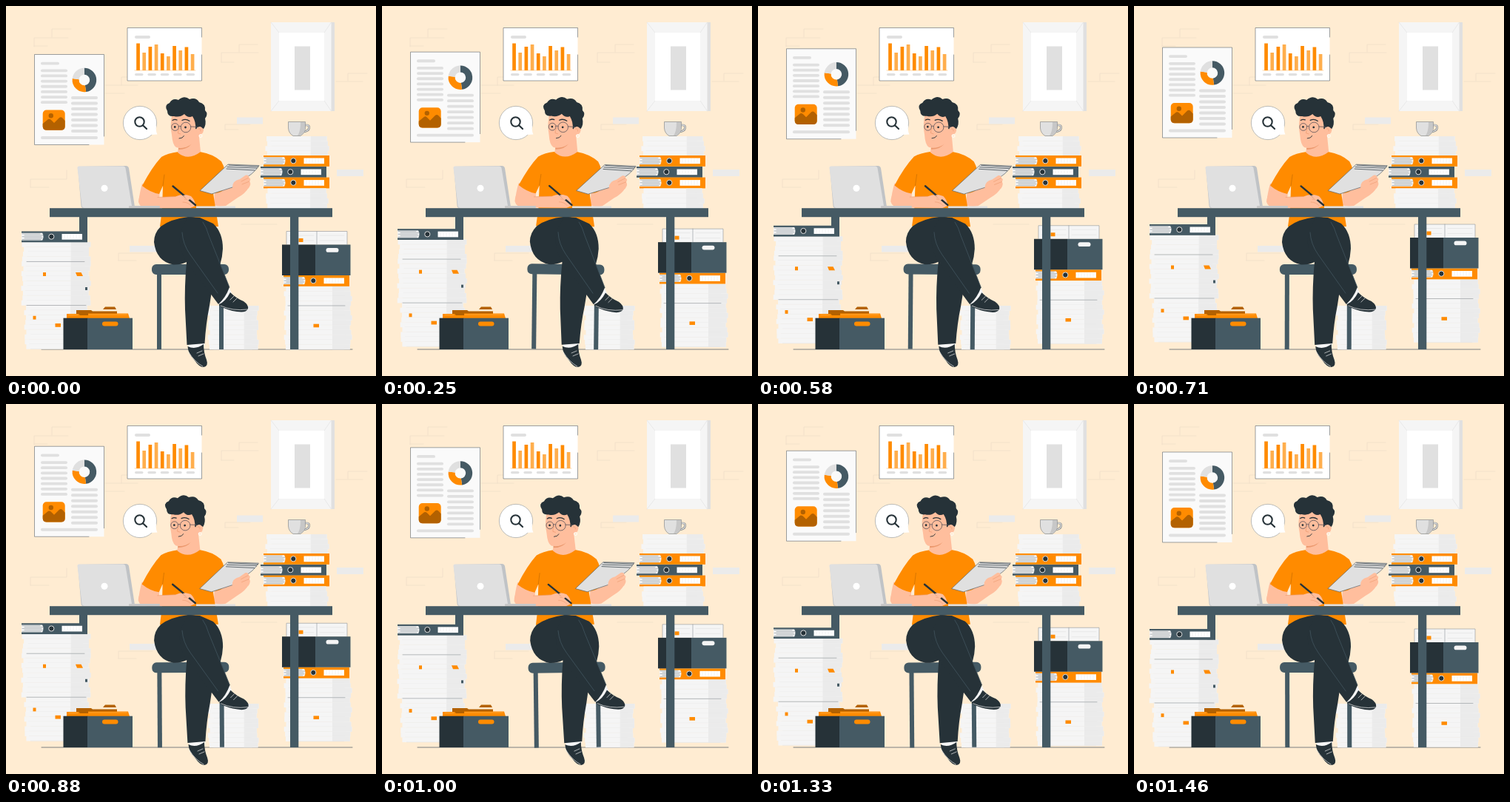
Recreate the animation shown at these times as an HTML page. Size 500x500 px, loop 1500 ms.

```html
<!DOCTYPE html>
<html lang="en">
<head>
<meta charset="utf-8">
<title>Paperwork</title>
<style>
  html, body { margin: 0; width: 100%; height: 100%; overflow: hidden; background: #ffecd2; }
  svg { display: block; width: 100vw; height: 100vh; }
</style>
</head>
<body>
<svg id="stage" viewBox="0 0 500 500"></svg>
<script>
const ORANGE = '#ff8b00', AMBER = '#ffae4d', BROWN = '#b36100', DARK = '#263238', SLATE = '#455a64',
  SKIN = '#ffbe9d', BLUSH = '#eb996e', GREY = '#e0e0e0', MIST = '#ebebeb', SNOW = '#f5f5f5',
  WHITE = '#fff', INK = '#59636a';

const rect = (x, y, w, h, fill, r = 0) =>
  `<rect x="${x}" y="${y}" width="${w}" height="${h}" rx="${r}" fill="${fill}"/>`;
const disc = (x, y, r, fill, stroke = 'none', w = 1) =>
  `<circle cx="${x}" cy="${y}" r="${r}" fill="${fill}" stroke="${stroke}" stroke-width="${w}"/>`;
const shape = (d, fill, stroke = 'none', w = .6) =>
  `<path d="${d}" fill="${fill}" stroke="${stroke}" stroke-width="${w}"/>`;
const line = (d, stroke, w = .6, cap = 'round') =>
  `<path d="${d}" fill="none" stroke="${stroke}" stroke-width="${w}" stroke-linecap="${cap}" stroke-linejoin="round"/>`;
const bar = (x, y, w) => rect(x, y - 1.9, w, 3.8, GREY, 1.9);
const range = (n, fn) => Array.from({ length: n }, (_, i) => fn(i)).join('');
const group = (cls, ...parts) => `<g class="${cls}">${parts.join('')}</g>`;

// A pile of loose sheets with uneven ends and a shaded right side.
function pages(x, y, w, h) {
  const n = Math.max(1, Math.round(h / 6.5)), step = h / n;
  return range(n, i => {
    const a = x + 2 + 1.5 * Math.sin(i * 2.3 + y), b = x + w - 2 + 1.5 * Math.sin(i * 1.7 + x);
    const top = y + i * step, split = x + w * .71;
    return rect(a, top, b - a, step + .2, SNOW) + rect(split, top, b - split, step + .2, MIST) +
      line(`M${a + 6} ${top + step}H${b - 8}`, GREY, .5);
  });
}

function binder(x, y, color) {
  return rect(x, y, 89, 14.8, color) + rect(x, y + 2.2, 28, 10, SNOW) +
    shape(`M${x + 28} ${y + 2}q3 5 0 10.5z`, SNOW) +
    range(5, i => line(`M${x + 1 + i % 2 * 3} ${y + 3.4 + i * 1.9}h${24 + i % 3}`, '#78828a', .55)) +
    disc(x + 40.3, y + 7.2, 3.6, DARK, GREY) +
    rect(x + 54.5, y + 3.5, 27.5, 7.7, WHITE) +
    range(6, i => line(`M${x + 58 + i * 4} ${y + 4.5}v5.5`, GREY, .4));
}

const wall = line('M38 55V43H84M62 42V31H88M38 54H56M291 76V63H341M315 62V52H340M291 76H308' +
    'M446 102H482M462 101V91H488M33 245V234H82V222M33 245H58M134 107H178M156 107V96H178M134 118H160' +
    'M296 167V160H330M296 167H314M152 344V334H198M152 344H176M318 295H366', '#efdfc8', .8) +
  rect(312, 150.5, 35, 9, MIST) + rect(447, 221, 36, 9, MIST) + rect(167, 324, 36, 8.5, MIST);

const ring = (d, color) => line(d, color, 9, 'butt');
const poster = rect(38.5, 65.5, 94, 122, '#fafafa') +
  line('M112 187.5H38.5V65.5H132.5V176', INK) +
  bar(47, 77.6, 25) +
  range(7, i => bar(47, 87.3 + i * 7.15, 36)) +
  range(7, i => bar(88, 124 + i * 7.5, 36)) +
  bar(47, 178, 77) +
  ring('M105.8 88.3A11.7 11.7 0 0 1 107.5 111.6', SLATE) +
  ring('M107.5 111.6A11.7 11.7 0 0 1 94.2 98.6', ORANGE) +
  ring('M94.2 98.6A11.7 11.7 0 0 1 105.8 88.3', GREY) +
  rect(49.7, 140.6, 30, 27.2, ORANGE, 5) + disc(60.8, 148.2, 3.2, BROWN) +
  shape('M49.7 159L57 153Q59 152 61 154L65 158L72 151Q74 149.5 76 151L79.7 155V162.8Q79.7 167.8 74.7 167.8H54.7Q49.7 167.8 49.7 162.8Z', BROWN);

const chart = rect(164, 29.5, 100.5, 71.5, WHITE) +
  line('M264.5 66V101H164V29.5H264.5V42', INK) + bar(174, 42, 21) +
  [50.5, 63, 55, 52, 64, 68, 54, 60, 55.5, 65]
    .map((y, i) => rect(176.2 + i * 8.17, y, 4.7, 87 - y, i % 2 ? AMBER : ORANGE)).join('') +
  line('M174 87H256', AMBER, .5) +
  range(5, i => rect(174 + i * 17.4, 91, 11.5, 3.2, GREY, 1.6));

const picture = rect(358, 22, 86, 120, GREY) + rect(358, 22, 81.5, 120, SNOW) +
  line('M358 22L369 36M439.5 22L430 36M358 142L369 128M439.5 142L430 128', GREY) +
  rect(369, 36, 61, 92, WHITE) + rect(390, 54.5, 21, 59, GREY);

const bubble = disc(181, 158, 22.6, WHITE, '#8d9498', .6) +
  shape('M195 174L204.5 173.5Q202 169 203.2 162L196 160Z', WHITE) +
  disc(180.5, 156.5, 6.2, 'none', DARK, 2.1) + line('M185 161.2L190 166', DARK, 2.2);

const handle = 'M403 161H407Q410 161 409.5 165T402 170';
const deskPile = pages(350, 176, 87, 26.5) + binder(348, 202, ORANGE) + binder(344, 217, SLATE) +
  binder(348, 231.6, ORANGE) + pages(350, 246.5, 86, 27) +
  line(handle, '#777d80', 2.6) + line(handle, GREY, 1.3) +
  shape('M381.5 156.5H404.5V165Q404 172 398 175.5H388Q382 172 381.5 165Z', GREY, '#777d80') +
  shape('M398 157H404V165Q404 172 398 175H394Q398 170 398 157Z', '#c7c7c7');

const leftPile = pages(21, 319, 94, 26) + pages(20, 345, 95, 59.5) + pages(24, 404.5, 89, 59) +
  line('M28 345.5H106M28 404.5H108', '#8b9398') + binder(21, 304.5, SLATE) +
  rect(50, 360, 4, 5, ORANGE) + shape('M94 360H101.5L104 365H96Z', ORANGE) + rect(107, 380, 3, 4, SLATE) +
  rect(36.5, 418.8, 4, 4.8, ORANGE) + rect(66.5, 429, 7.5, 4.8, ORANGE);

const rightPile = rect(379, 304.5, 82, 18, SNOW) + line('M379 322V304.5H461V322M420 304.5V322', '#8b9398') +
  line('M383 310H416M424 310H457M383 317H416M424 317H457', GREY) + rect(395.5, 314, 6, 5, ORANGE) +
  pages(375, 379, 93, 26) + pages(375, 405, 93, 59) + line('M381 405H458', '#8b9398') +
  binder(375, 364, ORANGE) +
  rect(373, 322.5, 45, 41.5, DARK) + rect(418, 322.5, 47.5, 41.5, SLATE) +
  rect(432.5, 327, 17, 5.8, SNOW, 2.9) + rect(415.5, 429.7, 7.5, 4.6, ORANGE);

const folderBox = shape('M131 410L134 406.5H147L149 410Z', BROWN) +
  shape('M95 411H115L117 412.5H150V422H95Z', BROWN) +
  shape('M82 416H98L100 418H111V415.5H165L167 422H82Z', ORANGE) +
  line('M112 417H163M85 417.5H97', AMBER, .7) +
  rect(77.5, 421.7, 33, 42.3, DARK) + rect(110, 421.7, 61, 42.3, SLATE) +
  rect(130, 426.5, 21.5, 6, ORANGE, 3);

const stool = rect(204, 360, 6, 104, SLATE) + rect(288, 360, 6, 104, SLATE) + rect(197, 349, 104, 14, SLATE, 6);

const legs =
  shape('M246 456H268L267 464L248 466Z', SNOW) +
  shape('M246 285Q222 288 209 298Q200 307 200 319Q203 345 226 349.5Q236 350 244 346Q241 380 242 410L244.5 458L268.5 456Q270 430 275 405L281 366Q292 350 293 328Q293 306 280 294L262 286Z', DARK) +
  shape('M286 402L302 381L305 388L292 404Z', SNOW) +
  shape('M246 285Q262 284 270 298L302 380Q297 394 287 403L242 343Q230 320 238 300Z', DARK) +
  line('M238 306Q239 322 249 336L286 388M266 292Q271 299 274 310L302 380', SLATE, .7) +
  shape('M288 403Q297 399 303 387Q311 395 321 399Q328 404 327 409Q325 413.5 318 413.5Q306 413 294 408Q288 406 288 403Z', DARK) +
  line('M290 405Q306 412.5 326 410M303 397L308 392M307 400L312 395', MIST, .7) +
  shape('M245.5 460Q256 465 267 457Q267 468 271 478Q274 487 267 488Q261 488 255 479Q246 470 245.5 460Z', DARK) +
  line('M247 468Q255 481 266 487M258 469L265 466M260 473L267 470', MIST, .7);

const torso =
  shape('M184 240Q180 254 179.5 265L207 262L208 248Z', SKIN) +
  shape('M282 250L281 269Q288 272 297 270L313 259Q324 253 328 245L314 239Z', SKIN) +
  shape('M233 197Q218 199 210 204Q197 218 184 243Q195 252 207 254L212 243L211 275L208 298H287L280 253Q296 253 298 240Q297 220 291 210Q280 200 262 197Z', ORANGE) +
  line('M212 243L214 228M280 253L277 236', '#c86d00', .7);

const hands =
  shape('M184 250Q179 258 179 265Q181 273 192 273H249L256 270Q256 263 250 257Q240 253 229 257.5L205 258.5Z', SKIN) +
  line('M241 261Q249 261 253 267M239 265Q246 265 250 270M205 258.5L229 257.5', BLUSH) +
  line('M225.5 243.5L256 269', DARK, 2.4) +
  shape('M239 256Q245 254 250 260L246 263Z', SKIN) +
  shape('M262 249.5L300 214L342 215.5Q335 227 318 236L306 245L278 254Z', GREY, INK, .7) +
  line('M301 215L341 217M299 217.5L339 219M298 220L336 222', DARK, .7) +
  shape('M306 245Q306 236 316 234L324 228.5Q329 228 328 232Q332 233 329 237Q332 240 328 246Q321 252 309 251Z', SKIN) +
  line('M318 237L328 232M319 241L329 237', BLUSH);

const head =
  shape('M234 185L232 198Q246 210 263 197L260 168Z', SKIN) +
  shape('M233 191.5Q245 192 251 186Q245 194 233 194Z', BLUSH) +
  shape('M225 144Q221 160 224 174Q225 188 230 191Q240 194 250 187Q258 181 261 174Q268 174 267 164L262 146Z', SKIN) +
  shape('M227 149Q218 150 218 142Q213 134 221 131Q225 124 233 127Q241 120 248 126Q257 123 261 130Q270 132 269 141Q274 146 269 152Q271 160 267 166Q262 162 259 167L256 166Q257 157 252 149Q246 152 241 146Q235 151 227 149Z', DARK) +
  disc(261.5, 167.5, 4.5, SKIN) + line('M260 166Q263 165 263 169', BLUSH) +
  disc(263, 175.5, 2, 'none', WHITE, .8) +
  disc(228.5, 163.5, 4.9, 'none', '#59545a', .8) + disc(243, 164, 6.8, 'none', '#59545a', .8) +
  line('M233 163Q235 161 236.4 163M249.8 163L260 163.5', '#59545a', .8) +
  disc(228.2, 163.5, 1.4, DARK) + disc(242.5, 164, 1.4, DARK) +
  line('M225 154.5Q228 152.5 231 154M238 154.5Q243 152 248 155.5', DARK, 1.3) +
  line('M234 165Q232 170 232.5 172L236 173', BLUSH, .7) + line('M234 179Q239 179 240.5 175.5', DARK, .9);

const laptop = shape('M97 217L162 216Q165 216 166 219L174 271.5L104 273Q102 273 101.5 270Z', '#c0c3c6') +
  shape('M96.5 219Q96 216.5 99 216.5H158Q161 216.5 161.5 219L170 270Q170 273 167 273H106Q103 273 102.5 270Z', GREY) +
  disc(133, 246.3, 4.5, WHITE) + rect(166, 270, 42, 3, '#c7c7c7', 1) + rect(257, 270.5, 53, 2.5, GREY);

const desk = rect(384, 280, 11.3, 184, SLATE) + rect(59, 273.2, 382, 12, SLATE);

const stage = document.getElementById('stage');
stage.innerHTML = wall + group('float', poster) + chart + picture + bubble + deskPile +
  line('M48 464H468', INK, .8) + rect(99, 285, 11, 34, SLATE) +
  group('float', leftPile) + pages(272, 405, 70, 59) + folderBox + group('float', rightPile) +
  group('sway', stool, torso, legs, head, hands) + laptop + desk;

const floaters = stage.querySelectorAll('.float'), person = stage.querySelector('.sway');
const LOOP = 1500;

function draw(now) {
  const p = now % LOOP / LOOP;
  const lift = -10 * (1 - Math.abs(1 - 2 * p));
  const angle = p < .25 ? 4 * p : p < .75 ? 2 - 4 * p : 4 * p - 4;
  floaters.forEach(g => g.setAttribute('transform', `translate(0 ${lift})`));
  person.setAttribute('transform', `rotate(${angle} 262 305)`);
  requestAnimationFrame(draw);
}
draw(performance.now());
</script>
</body>
</html>
```
